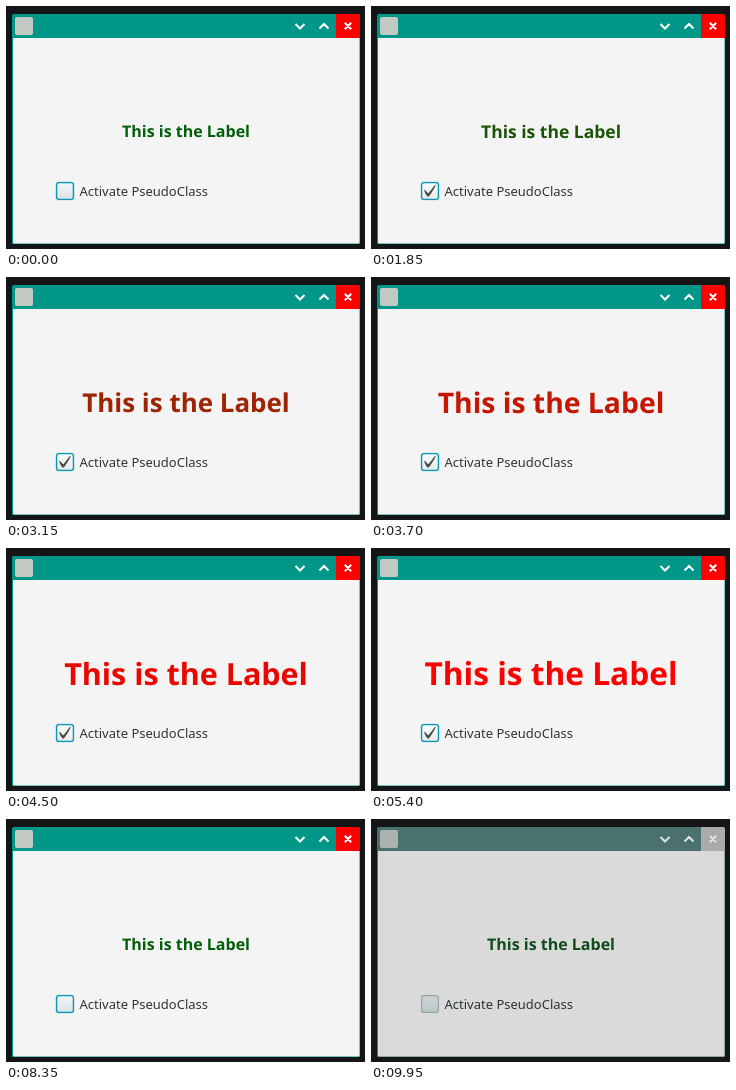
Animation of 359x243 px, one loop 10000 ms. Source, as an HTML page:

```html
<!DOCTYPE html>
<html lang="en">
<head>
<meta charset="utf-8">
<title>Label transition</title>
<style>
  html, body { margin: 0; width: 100%; height: 100%; overflow: hidden; background: #141516; }
  svg { display: block; width: 359px; height: 243px; }
  text { font-family: "Noto Sans", sans-serif; }
  .glyph { fill: none; stroke-width: 2; }
  #label { font-weight: 700; text-anchor: middle; text-rendering: geometricPrecision; }
</style>
</head>
<body>
<svg viewBox="0 0 359 243">
  <defs>
    <linearGradient id="face" x2="0" y2="1">
      <stop id="faceTop"/>
      <stop id="faceBottom" offset="1"/>
    </linearGradient>
  </defs>
  <rect width="359" height="243" fill="#141516"/>
  <path id="frame" d="M6 238V10q0-2 2-2H352q2 0 2 2V238z"/>
  <path id="body" d="M7 32H353.5V236.5L352.5 237.5H8L7 236.5z"/>
  <rect id="icon" x="9" y="11" width="18" height="18" rx="2"/>
  <path id="close" d="M330 8H352q2 0 2 2V32H330z"/>
  <path class="glyph" d="M289.5 18L294 22.5L298.5 18M313.5 22.5L318 18L322.5 22.5M338.8 16.8L345.2 23.2M345.2 16.8L338.8 23.2"/>

  <text id="label" x="180"/>

  <rect id="glow" x="49.2" y="175.2" width="19.6" height="19.6" rx="4" fill="#039ed3"/>
  <rect id="box" x="50.6" y="176.6" width="16.8" height="16.8" rx="2.5" fill="url(#face)" stroke-width="1.3"/>
  <path id="mark" fill="#4a4a4a" transform="translate(53.5 179.5) scale(.7)"
    d="M-.25 6.08c.84-.76 4.58 4.84 5.75 4.84S14.5-1.5 15.92-.92c1.29.53-8.75 17.09-10.5 17.09C3 16.17-1.1 6.84-.25 6.08z"/>
  <text id="caption" x="73.5" y="190" font-size="13">Activate PseudoClass</text>
</svg>
<script>
const LOOP = 10000, STEP = 50;
const HOVER = 1100, CHECKED = 1250, GROW = 1350, GROW_TIME = 5000;
const UNCHECKED = 7850, LEAVE = 8350, BLUR = 9850;

const el = id => document.getElementById(id);
const glyphs = document.querySelector(".glyph");
const clamp = v => Math.min(1, Math.max(0, v));
const lerp = (a, b, k) => a + (b - a) * k;
const mix = (a, b, k) => a.map((v, i) => lerp(v, b[i], k));
const rgb = c => `rgb(${c.map(Math.round)})`;

// cubic-bezier(.25, .1, .25, 1)
function ease(x) {
  const bezier = (p1, p2, s) => 3 * p1 * s * (1 - s) ** 2 + 3 * p2 * s * s * (1 - s) + s ** 3;
  let low = 0, high = 1;
  for (let i = 0; i < 24; i++) {
    const mid = (low + high) / 2;
    if (bezier(.25, .25, mid) < x) low = mid; else high = mid;
  }
  return bezier(.1, 1, high);
}

// Each part: focused and unfocused window colours.
const palette = {
  frame: [[0, 150, 136], [74, 113, 109]],
  body: [[244, 244, 244], [218, 218, 218]],
  icon: [[194, 200, 194], [172, 178, 173]],
  close: [[255, 0, 0], [168, 170, 172]],
  caption: [[51, 51, 51], [42, 50, 50]]
};

function render(time) {
  const t = Math.floor(time % LOOP / STEP) * STEP;
  const checked = t >= CHECKED && t < UNCHECKED;
  const hover = t >= HOVER && t < LEAVE;
  const blur = t < BLUR ? 0 : clamp((t - BLUR + STEP) / 150);
  const grown = checked ? ease(clamp((t - GROW) / GROW_TIME)) : 0;

  for (const id in palette) el(id).setAttribute("fill", rgb(mix(...palette[id], blur)));
  glyphs.setAttribute("stroke", rgb(mix([255, 255, 255], [222, 226, 225], blur)));

  const size = lerp(16, 32, grown), label = el("label");
  const color = mix([2, 94, 8], [255, 0, 0], grown);
  label.textContent = "This is the Label";
  label.setAttribute("font-size", size);
  label.setAttribute("y", 125 + size * .388);
  label.setAttribute("fill", rgb(mix(color, [16, 76, 28], blur)));

  const top = hover ? [250, 250, 250] : [242, 246, 247];
  const bottom = hover ? [232, 234, 234] : [220, 227, 229];
  el("faceTop").setAttribute("stop-color", rgb(mix(top, [207, 214, 216], blur)));
  el("faceBottom").setAttribute("stop-color", rgb(mix(bottom, [186, 198, 200], blur)));
  el("box").setAttribute("stroke", rgb(mix([8, 150, 178], [152, 163, 164], blur)));
  el("glow").setAttribute("opacity", .16 * (1 - blur));
  el("mark").setAttribute("opacity", checked ? 1 : 0);
}

function tick() {
  render(performance.now());
  requestAnimationFrame(tick);
}
tick();
</script>
</body>
</html>
```
